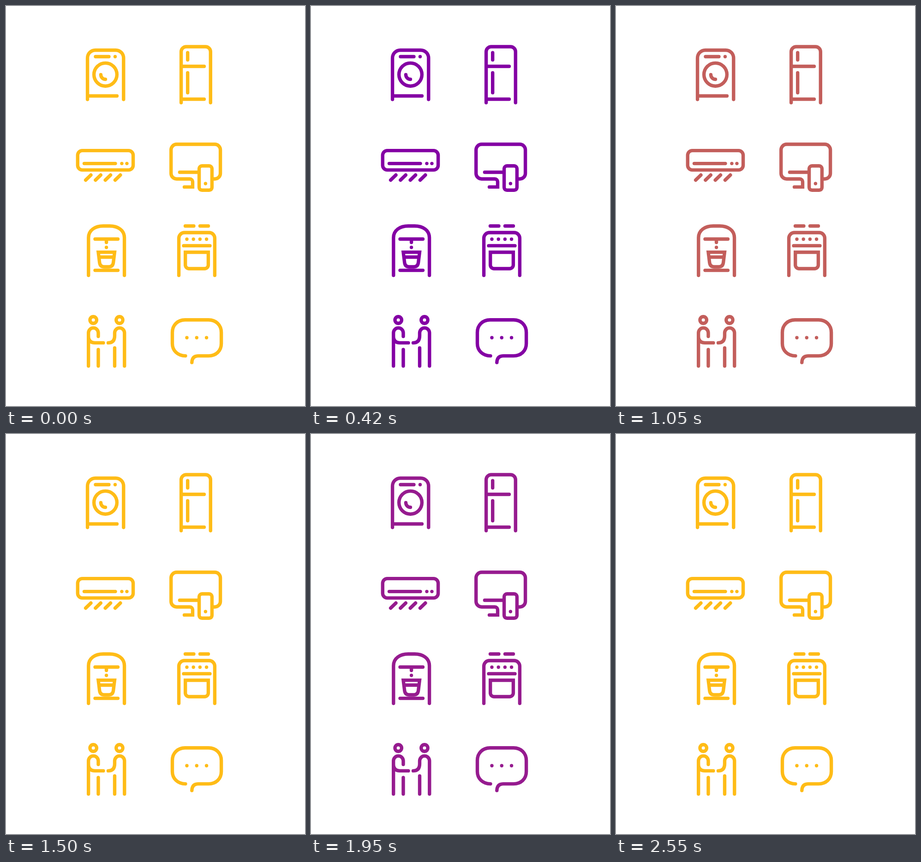
Animation of 648x865 px, one loop 2.58 s. Source, as an HTML page:

```html
<!DOCTYPE html>
<html lang="en">
<head>
<meta charset="utf-8">
<title>Appliance icons</title>
<style>
  html, body { margin: 0; width: 100%; height: 100%; overflow: hidden; background: #fff; }
  svg { display: block; fill: none; stroke: currentColor; stroke-width: 7.4; stroke-linecap: round; }
</style>
</head>
<body>
<svg id="icons" width="648" height="865" viewBox="0 0 648 865">
  <!-- washing machine -->
  <path d="M176.6 202V112.5a17 17 0 0 1 17-17h44.2a17 17 0 0 1 17 17V202M176.6 194.5H240.5M194 109.5H223M236.5 109.5h0M205.5 148.5a10 10 0 0 0 10 10"/>
  <circle cx="215.5" cy="148.3" r="24.9"/>
  <!-- fridge -->
  <path d="M379.6 209V99a11 11 0 0 1 11-11h41.7a11 11 0 0 1 11 11V209M379.6 130.5H429.5M379.6 201.5H429.5M393.7 101V116.5M393.7 144.5V187.5"/>
  <!-- air conditioner -->
  <rect x="155.3" y="312.6" width="120.3" height="42" rx="10"/>
  <path d="M169.5 340.6H237M251 340.6h0M262 340.6h0M172.6 376.5l11.4-11M193.9 376.5l11.4-11M215.2 376.5l11.4-11M236.5 376.5l11.4-11"/>
  <!-- television and phone -->
  <path d="M450 374h2.6a12 12 0 0 0 12-12V311a12 12 0 0 0-12-12h-82.9a12 12 0 0 0-12 12v51a12 12 0 0 0 12 12h28.8a6 6 0 0 1 6 6V391.4H386.5M376.4 359.5H418M432.4 384h0"/>
  <rect x="418.6" y="345.8" width="27.8" height="52.5" rx="6"/>
  <!-- coffee machine -->
  <path d="M178.8 582.5V501c0-16 14-25.2 32-25.2h13.8c18 0 32 9.2 32 25.2V582.5M193 504H242.5M217.6 504V511.3M217.6 522h0M193 571.6H242.5"/>
  <path d="M200 532.4H235.4L232.6 555q-1.2 9-10 9h-9.8q-8.8 0-10-9ZM202 543H233.4"/>
  <!-- stove -->
  <path d="M388.5 475.7H407M420.5 475.7H438.5M374.6 582.5V502a12 12 0 0 1 12-12h53.8a12 12 0 0 1 12 12V582.5M392 504.2h0M406.2 504.2h0M420.4 504.2h0M434.6 504.2h0M385 518.4H442"/>
  <path d="M388.7 532.5H438.4V560a8 8 0 0 1-8 8h-33.7a8 8 0 0 1-8-8Z"/>
  <!-- handshake -->
  <circle cx="189.2" cy="679" r="7.2"/>
  <circle cx="246" cy="679" r="7.2"/>
  <path d="M178.7 778.5V706.8a10.65 10.65 0 0 1 21.3 0V714.5M178.7 706.8V714q0 14.4 14.4 14.4H211M200 743V778.5"/>
  <path d="M256.8 778.5V706.8a10.65 10.65 0 0 0-21.3 0V713q0 15.4-14 15.4M235.5 739.5V778.5"/>
  <!-- speech bubble -->
  <path d="M389 756.6C372 756.6 360.5 745 360.5 730V706C360.5 690 372 678.8 388 678.8H439c16 0 27.6 11.2 27.6 27.2v24c0 16-11.6 26.6-27.6 26.6H417q-13.8 0-14.2 14.4M392 717.3h0M413.3 717.3h0M434.6 717.3h0"/>
</svg>
<script>
  const STEP = 30, CYCLE = 43;
  const yellow = [255, 188, 23], purple = [132, 0, 164], red = [195, 94, 91];
  // Each colour holds, then fades linearly to the next; times are in steps.
  const fades = [
    { start: 7, end: 14, from: yellow, to: purple },
    { start: 20, end: 27, from: purple, to: red },
    { start: 35, end: 42, from: red, to: yellow }
  ];
  const icons = document.getElementById('icons');

  function colorAt(step) {
    const fade = fades.find(f => step < f.end) || fades[2];
    const k = Math.min(1, Math.max(0, (step - fade.start) / (fade.end - fade.start)));
    return fade.from.map((c, i) => Math.round(c + (fade.to[i] - c) * k));
  }

  function draw() {
    const step = Math.floor(performance.now() / STEP) % CYCLE;
    icons.style.color = `rgb(${colorAt(step)})`;
    requestAnimationFrame(draw);
  }
  draw();
</script>
</body>
</html>
```
